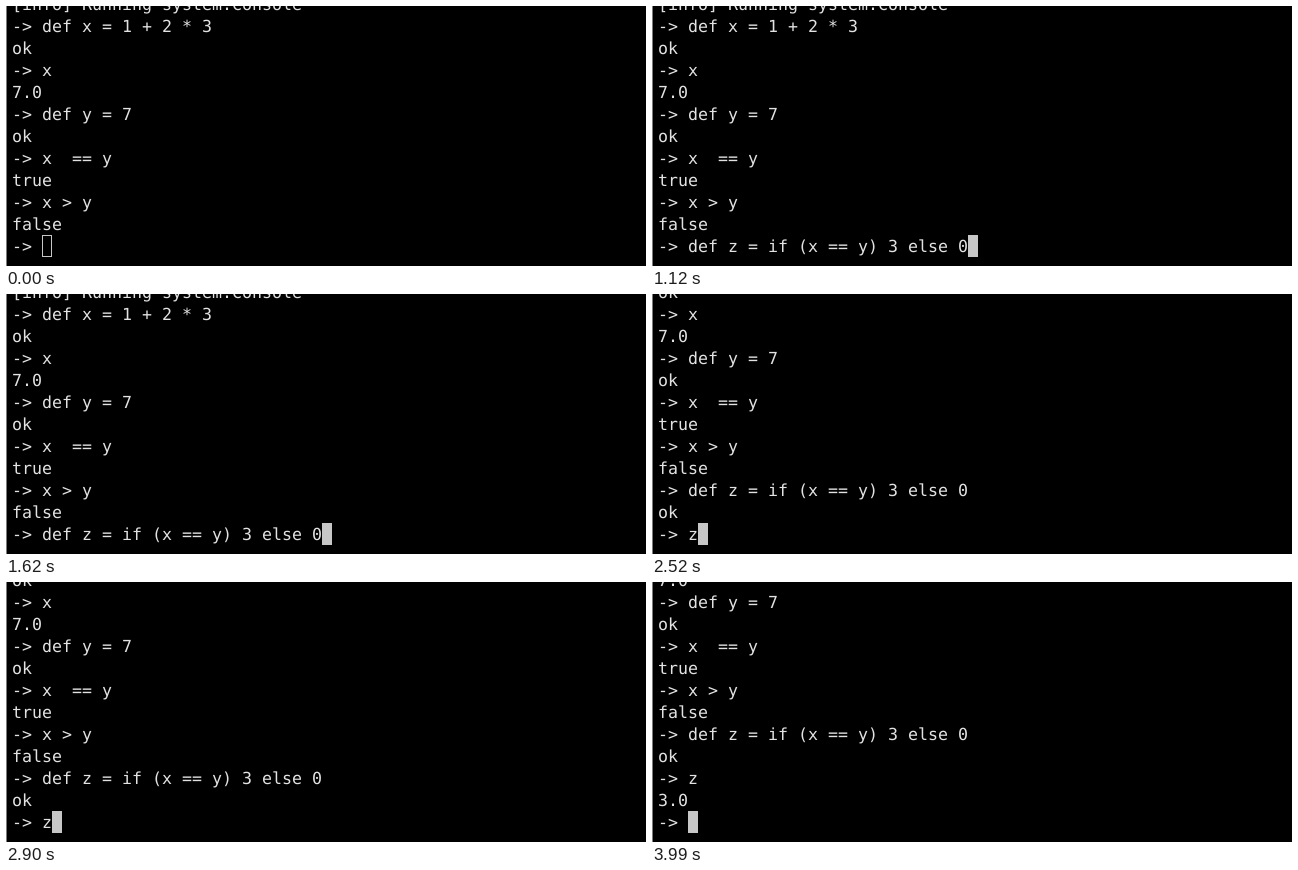
Recreate the animation shown at these times as an HTML page. Size 640 by 260 pixels, loop 4.55 s.

```html
<!DOCTYPE html>
<html lang="en">
<head>
<meta charset="utf-8">
<title>Console session</title>
<style>
  html, body { margin: 0; width: 100%; height: 100%; overflow: hidden; background: #000; }
  svg { display: block; }
  text {
    font: 16.61px "DejaVu Sans Mono", Menlo, monospace;
    fill: #e2e2e2;
    white-space: pre;
    text-rendering: geometricPrecision;
  }
</style>
</head>
<body>
<svg width="640" height="260" viewBox="0 0 640 260">
  <rect width="1" height="260" fill="#7c7c7c"/>
  <rect id="cursor" y="229" width="10" height="22"/>
  <g id="rows"></g>
</svg>
<script>
const LOOP = 4550, LEFT = 6, CELL = 10, LINE = 22, BASE = 246, ROWS = 12;

const session = [
  "[info] Running system.Console",
  "-> def x = 1 + 2 * 3", "ok",
  "-> x", "7.0",
  "-> def y = 7", "ok",
  "-> x  == y", "true",
  "-> x > y", "false",
  "-> def z = if (x == y) 3 else 0", "ok",
  "-> z", "3.0"
];

// start time, finished lines, current input line, window focused
const steps = [
  [0, 11, "-> ", false],
  [560, 11, "-> ", true],
  [1120, 11, session[11], true],
  [1960, 13, "-> ", true],
  [2520, 13, session[13], true],
  [3150, 15, "-> ", true]
];

const cursor = document.getElementById("cursor");
const group = document.getElementById("rows");
const rows = Array.from({ length: ROWS }, (_, i) => {
  const row = document.createElementNS("http://www.w3.org/2000/svg", "text");
  row.setAttribute("x", LEFT);
  row.setAttribute("y", BASE - (ROWS - 1 - i) * LINE);
  return group.appendChild(row);
});

function setAttrs(el, attrs) {
  for (const key in attrs) el.setAttribute(key, attrs[key]);
}

function show([, count, input, focused]) {
  const lines = [...session.slice(0, count), input].slice(-ROWS);
  rows.forEach((row, i) => row.textContent = lines[i]);
  const x = LEFT + input.length * CELL;
  setAttrs(cursor, focused
    ? { x, y: 229, width: 10, height: 22, fill: "#c7c7c7", stroke: "none" }
    : { x: x + 0.5, y: 229.5, width: 9, height: 21, fill: "none", stroke: "#c7c7c7" });
}

let current;
function tick() {
  const t = performance.now() % LOOP;
  const step = steps.findLast(s => s[0] <= t);
  if (step !== current) show(current = step);
  requestAnimationFrame(tick);
}
tick();
</script>
</body>
</html>
```
